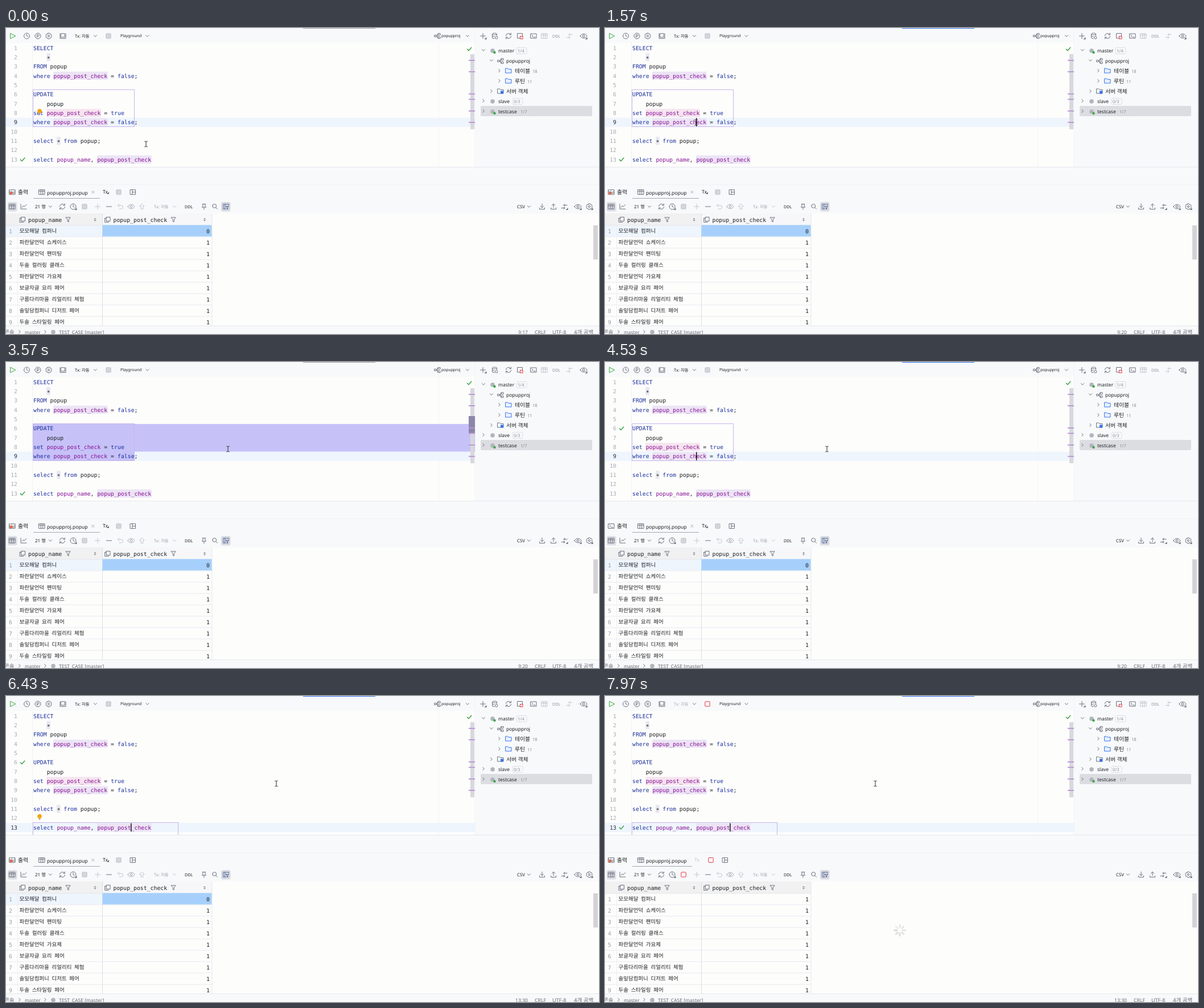
Animation, 1042 px wide and 538 px high, one loop 8 s. Source, as an HTML page:

```html
<!DOCTYPE html>
<html lang="en">
<head>
<meta charset="utf-8">
<title>SQL console</title>
<style>
html, body { margin: 0; width: 100%; height: 100%; overflow: hidden; background: #f8f9fa; }
svg { display: block; width: 1042px; height: 538px; }
text { white-space: pre; text-rendering: geometricPrecision; font-family: "Noto Sans", "Noto Sans CJK KR", sans-serif; }
.mono { font-family: "DejaVu Sans Mono", "Noto Sans Mono", monospace; }
.cjk { font-family: "Noto Sans Mono CJK KR", "Noto Sans CJK KR", monospace; }
.key { fill: #1c2f9c; }
.col { fill: #871094; }
.icon { fill: none; stroke-width: 1; stroke-linejoin: round; stroke-linecap: round; }
.on { animation: 8s step-end infinite; }

.focus { animation-name: focus; }
.bulb8 { animation-name: bulb8; }
.bulb12 { animation-name: bulb12; }
.caret9 { animation-name: caret9; }
.caret13 { animation-name: caret13; }
.pick6 { animation-name: pick6; }
.pick13 { animation-name: pick13; }
.at9 { animation-name: at9; }
.at13 { animation-name: at13; }
.check6 { animation-name: check6; }
.check13 { animation-name: check13; }
.badge { animation-name: badge; }
.pos1 { animation-name: pos1; }
.pos2 { animation-name: pos2; }
.idle { animation-name: idle; }
.busy { animation-name: busy; }
.mouse { animation: mouse 8s ease-in-out infinite; }
.spin { animation: spin 1s steps(8) infinite; }

@keyframes focus { 0%, 42.5%, 84% { opacity: 0 } 17.5%, 52.5%, 94% { opacity: 1 } }
@keyframes bulb8 { 0%, 27.5% { opacity: 1 } 17.5%, 42.5%, 100% { opacity: 0 } }
@keyframes bulb12 { 0%, 84%, 100% { opacity: 0 } 78.75% { opacity: 1 } }
@keyframes caret9 { 0%, 23.75%, 36.25%, 58.75%, 67.5%, 100% { opacity: 0 } 17.5%, 30%, 52.5%, 65% { opacity: 1 } }
@keyframes caret13 { 0%, 73.75%, 84% { opacity: 0 } 67.5%, 80%, 94% { opacity: 1 } }
@keyframes pick6 { 0%, 52.5%, 100% { opacity: 0 } 42.5% { opacity: 1 } }
@keyframes pick13 { 0%, 94%, 100% { opacity: 0 } 84% { opacity: 1 } }
@keyframes at9 { 0% { opacity: 1 } 67.5%, 100% { opacity: 0 } }
@keyframes at13 { 0% { opacity: 0 } 67.5%, 100% { opacity: 1 } }
@keyframes check6 { 0%, 94%, 100% { opacity: 0 } 52.5% { opacity: 1 } }
@keyframes check13 { 0%, 94% { opacity: 1 } 52.5% { opacity: 0 } }
@keyframes badge { 0%, 62.5% { opacity: 1 } 52.5% { opacity: 0 } }
@keyframes pos1 { 0% { opacity: 1 } 17.5%, 100% { opacity: 0 } }
@keyframes pos2 { 0%, 67.5%, 100% { opacity: 0 } 17.5% { opacity: 1 } }
@keyframes idle { 0% { opacity: 1 } 94.5%, 100% { opacity: 0 } }
@keyframes busy { 0% { opacity: 0 } 94.5%, 100% { opacity: 1 } }
@keyframes mouse {
  0%, 5% { transform: translate(246px, 204px) }
  15%, 21% { transform: translate(160px, 166px) }
  29%, 62% { transform: translate(390px, 153px) }
  66.5%, 69% { transform: translate(220px, 231px) }
  77%, 100% { transform: translate(475px, 154px) }
}
@keyframes spin { to { transform: rotate(360deg) } }
</style>
</head>
<body>
<svg id="stage" viewBox="0 0 1042 538"></svg>
<script>
const GREY = '#6c707e', DIM = '#c3c6cf', INK = '#1f2024', RED = '#db3b4b', GREEN = '#3fa54a', BLUE = '#3574f0';
const PANEL = '#f8f9fa', PAPER = '#fdfdfc';
const CH = 5.92, LEFT = 48, PITCH = 16.35;
const lineY = n => 35 + PITCH * (n - 1);
const ring = r => `M${-r} 0a${r} ${r} 0 1 0 ${2 * r} 0a${r} ${r} 0 1 0 ${-2 * r} 0`;

// Icon outlines, centred on 0,0
const icons = {
  run: 'M-4-4.6L4.8 0L-4 4.6Z',
  clock: ring(5) + 'M0-3V0L2.3 1',
  plan: ring(5) + 'M-1.3 2.6V-2.5H.6a1.5 1.5 0 0 1 0 3H-1.3',
  gear: 'M-1.3-5H1.3L2-3.4L3.8-3.6L5.1-1.4L4.1 0L5.1 1.4L3.8 3.6L2 3.4L1.3 5H-1.3L-2 3.4L-3.8 3.6L-5.1 1.4L-4.1 0L-5.1-1.4L-3.8-3.6L-2-3.4Z' + ring(1.6),
  screen: 'M-3.2-4.2H3.2V2.2H-3.2ZM-5-4.2V4.4H5V-4.2',
  down: 'M-2.6-1.3L0 1.3L2.6-1.3',
  right: 'M-1.3-2.6L1.3 0L-1.3 2.6',
  schema: 'M-5-1.5h3v3h-3zM1.5-4.5H5v3H1.5zM1.5 1.5H5v3H1.5zM-2 0H0M1.5-3H0V3H1.5',
  plus: 'M-4.5 0H4.5M0-4.5V4.5',
  minus: 'M-4.5 0H4.5',
  base: 'M-4.5-3.5c0-2 8-2 8 0s-8 2-8 0V3c0 1.3 2 1.7 3.5 1.7M3.5-3.5V-.5M-4.5-.3c0 1 2 1.6 3.5 1.6M.5 3a2.2 2.2 0 1 0 4.4 0a2.2 2.2 0 1 0-4.4 0',
  refresh: 'M-4.6-.5A4.7 4.7 0 0 1 4-2.4M4.4-5V-2.2H1.6M4.6.5A4.7 4.7 0 0 1-4 2.4M-4.4 5V2.2H-1.6',
  cut: 'M.5 4H-4.5V-4.5H4.5V0',
  console: 'M-5-4H5V4H-5ZM-3-2L-1-.2L-3 1.6M0 2H3',
  table: 'M-5-4.2H5V4.2H-5ZM-5-1.4H5M-1.7-4.2V4.2M1.7-4.2V4.2',
  swap: 'M5-2.5H-1M1-4.5L-1-2.5L1-.5M-5 2.5H1M-1 .5L1 2.5L-1 4.5',
  eye: 'M-6 0C-3.5-5 3.5-5 6 0C3.5 5-3.5 5-6 0Z' + ring(1.9),
  layout: 'M-4.5-4.2H4.5V4.2H-4.5ZM-1-4.2V4.2M-1 0H4.5',
  chart: 'M-5-4.5V4.2H5M-3 1.5L-.5-1.5L1 .3L4.8-3.5',
  undo: 'M-2-4.5L-4.5-2L-2 .5M-4.5-2H1.5a3 3 0 0 1 0 6H-2',
  up: 'M0-4.8L4.2-.5H1.8V4.5H-1.8V-.5H-4.2Z',
  pin: 'M-2.8-4.5H2.8M-2-4.5V-1L-3.5 1.2H3.5L2-1V-4.5M0 1.2V5',
  search: 'M-4.2-1a3.4 3.4 0 1 0 6.8 0a3.4 3.4 0 1 0-6.8 0M1.7 1.5L4.5 4.3',
  funnel: 'M-4-4H4L1 0V4L-1 3V0Z',
  filter: 'M-.5 4.2H-4.8V-4.2H4.8V-2.2M-1.8-4.2V4.2M0-.5H5L3.2 1.8V4.5H1.8V1.8Z',
  column: 'M-2-4.5H4.5V2.5H-2ZM-4.8-2.5V4.5H2M-4.8-2.5H-2',
  sort: 'M-1.5-1L0-2.6L1.5-1ZM-1.5 1L0 2.6L1.5 1Z',
  load: 'M0-4.8V1.8M-2.8-1L0 1.8L2.8-1M-4.5 2V4.5H4.5V2',
  send: 'M0 1.8V-4.8M-2.8-2L0-4.8L2.8-2M-4.5 2V4.5H4.5V2',
  folder: 'M-5-4H-1.5L0-2.6H5V4H-5Z',
  check: 'M-3.6 .2L-1 2.8L3.8-2.8',
  cross: 'M-2-2L2 2M2-2L-2 2',
  beam: 'M-2.3-4.8C-1-4.8 0-4.5 0-3.8C0-4.5 1-4.8 2.3-4.8M0-4V4M-2.3 4.8C-1 4.8 0 4.5 0 3.8C0 4.5 1 4.8 2.3 4.8'
};

const I = (name, x, y, color = GREY, extra = '') =>
  `<path class="icon" d="${icons[name]}" transform="translate(${x} ${y})" stroke="${color}" ${extra}/>`;
const R = (x, y, w, h, fill, extra = '') =>
  `<rect x="${x}" y="${y}" width="${w}" height="${h}" fill="${fill}" ${extra}/>`;
const T = (x, y, s, size = 8.6, fill = INK, extra = '') =>
  `<text x="${x}" y="${y + size * .36}" font-size="${size}" fill="${fill}" ${extra}>${s}</text>`;
const M = (x, y, s, fill = INK, extra = '') => T(x, y, s, 9.83, fill, 'class="mono" ' + extra);
const G = (name, body) => `<g class="on ${name}">${body}</g>`;
const dot = (x, y, r, fill) => `<circle cx="${x}" cy="${y}" r="${r}" fill="${fill}"/>`;
const stop = (x, y, on) => on
  ? R(x - 4.2, y - 4.2, 8.4, 8.4, '#fff3f3', `rx="1" stroke="${RED}"`)
  : R(x - 4.2, y - 4.2, 8.4, 8.4, '#d3d5db', 'rx="1" stroke="#c3c5cc"');
const corner = (x, y) => `<path d="M${x + 2.5} ${y + 6}h4v-4z" fill="${GREY}"/>`;
const row = (y, list) => list.map(([name, x, color]) => I(name, x, y, color)).join('');
const menu = list => list.map(([x, y]) => corner(x, y)).join('');
const bulb = y => dot(59, y, 3.8, '#f2a50f') + R(57.4, y + 4.2, 3.2, 1.4, '#8d8474');

function topBar() {
  return I('run', 12, 14, GREEN, 'style="fill:#eef8ee"') +
    row(14, [['clock', 36.5], ['plan', 56], ['gear', 75], ['screen', 100], ['down', 157], ['down', 248.5],
      ['schema', 758], ['down', 811], ['plus', 838], ['base', 859], ['refresh', 883], ['cut', 903],
      ['console', 927], ['table', 946, DIM], ['swap', 990, DIM], ['eye', 1015]]) +
    R(903.5, 14.5, 4.5, 4.5, '#fff', `stroke="${RED}"`) +
    menu([[838, 14], [1015, 14]]) +
    G('idle', T(121, 14, 'Tx: 자동', 7.5) + stop(180, 14)) +
    G('busy', T(121, 14, 'Tx: 자동', 7.5, '#a8abb5') + stop(180, 14, true)) +
    T(201, 14, 'Playground', 6.9) + T(765, 14, 'popupproj', 6.8) + T(960, 14, 'DDL', 7.1, '#8d909c') +
    R(522, 0, 127, 1, '#9a9ca6') + G('focus', R(522, 0, 127, 1, BLUE));
}

const code = ['SELECT', '    *', 'FROM popup', 'where popup_post_check = false;', '', 'UPDATE', '    popup',
  'set popup_post_check = true', 'where popup_post_check = false;', '', 'select * from popup;', '',
  'select popup_name, popup_post_check'];

// The asterisk is lowered to the middle of the line
function paint(s) {
  return s.replace(/\b(select|from|where|update|set|true|false)\b|popup_\w+/gi,
    (w, key) => `<tspan class="${key ? 'key' : 'col'}">${w}</tspan>`)
    .replace(/\*(.*)/, '<tspan dy="1.7">*</tspan><tspan dy="-1.7">$1</tspan>');
}

function marks(s, n) {
  return [...s.matchAll(/popup_post_check|\*/g)].map(m =>
    R(LEFT + m.index * CH - .4, lineY(n) - 7.2, m[0].length * CH + .8, 14.2,
      m[0] === '*' ? '#e9e7f1' : n === 8 ? '#f6e4ef' : '#ece4f5', 'rx="1"')).join('');
}

function editor() {
  const lines = code.map((s, i) => [s, i + 1]);
  const band = n => R(0, lineY(n) - 8.2, 824, 16.4, '#eff5fd');
  const frame = (w, y, h) => `<rect x="47.5" y="${y}" width="${w}" height="${h}" fill="none" stroke="#c7b5ea"/>`;
  const caret = (c, n) => R(LEFT + (c - 1) * CH - .5, lineY(n) - 7.5, 1.4, 14.5, '#000');
  const number = n => M(20, lineY(n), n, '#a9acb8', 'text-anchor="end"');
  const active = n => M(20, lineY(n), n, '#3f434e', 'text-anchor="end"');
  const ok = n => I('check', 29, lineY(n), GREEN, 'style="stroke-width:1.5"');
  const pick = '#c6c2f8';
  return `<svg width="824" height="244">` + R(0, 26, 824, 218, PAPER) +
    G('at9', band(9)) + G('at13', band(13)) +
    R(46, 26, 1, 218, '#f0f0f3') + R(760, 26, 1, 218, '#f3f4f6') +
    lines.map(([s, n]) => marks(s, n)).join('') +
    G('pick6', R(LEFT, 109, 776, 48.6, pick) + R(LEFT, 157, 178, 16.5, pick)) +
    G('pick13', R(LEFT, 223, 776, 21, pick)) +
    G('at9', frame(178, 108.5, 65)) + G('at13', frame(255, 222.5, 30)) +
    lines.map(([s, n]) => number(n) + M(LEFT, lineY(n), paint(s))).join('') +
    G('at9', active(9)) + G('at13', active(13)) +
    G('check6', ok(6)) + G('check13', ok(13)) +
    G('bulb8', bulb(146)) + G('bulb12', bulb(211.5)) +
    G('caret9', caret(20, 9)) + G('caret13', caret(30, 13)) +
    R(816, 46, 7, 132, '#d8d8de') + G('pick6', R(813, 95, 11, 31, '#8c86ab')) +
    [57, 77, 116, 125.5, 146, 166].map(y => R(813, y - 1, 11, 1.8, '#b795d3')).join('') +
    I('check', 814, 37, GREEN, 'style="stroke-width:1.5"') + '</svg>';
}

function tree() {
  const label = (x, y, s) => T(x, y, s, /[가-힣]/.test(s) ? 9.8 : 8.5);
  const badge = (x, y, s) => R(x - 2, y - 5.5, 18, 11, 'none', 'rx="2" stroke="#dcdee4"') + T(x, y, s, 7.6, '#8a8d98');
  const host = (y, name, x, count, open) =>
    I(open ? 'down' : 'right', 839, y - 1) + dot(855, y, 3.8, '#b0b5bd') + label(865, y, name) + badge(x, y, count);
  const folder = (x, y) => I('folder', x, y, BLUE, 'style="fill:#e9f0fe"');
  return R(834, 137, 196, 18, '#dcdde1', 'rx="2"') +
    host(40, 'master', 899, '1/4', true) + host(129, 'slave', 892, '0/3') + host(147, 'testcase', 904, '1/7') +
    dot(858.5, 43, 2.2, GREEN) + dot(858.5, 150, 2.2, GREEN) +
    I('down', 853, 57) + I('schema', 869, 58) + label(879, 58, 'popupproj') +
    I('right', 867, 75) + folder(883, 75) + label(894, 75, '테이블') + T(925, 76, '18', 7.6, '#8a8d98') +
    I('right', 867, 93) + folder(883, 93) + label(894, 93, '루틴') + T(916, 94, '11', 7.6, '#8a8d98') +
    I('right', 853, 111) + I('folder', 869, 111) + R(869, 110.5, 5, 5, BLUE) + label(879, 111, '서버 객체');
}

function tabs() {
  const tab = (end, extra) => R(48, 299, end - 48, 1, '#a2a6b2') + extra;
  return I('console', 11, 288.5) + G('badge', R(6, 283, 5, 11, PANEL) + I('layout', 11, 288.5, '#8a8d98') +
      `<path d="M7 287l6 3.2l-6 3.2z" fill="#e5623f"/>`) +
    T(21, 288.5, '출력', 9.8) + I('table', 63, 288.5, GREY) + T(72, 290, 'popupproj.popup', 8.67) +
    G('idle', tab(165, I('cross', 153, 288.5, '#a5a8b3') + T(170, 288, 'Tx', 8.6) + corner(174.5, 286) + stop(198, 288.5) + I('layout', 223, 288.5))) +
    G('busy', tab(153, T(157, 288, 'Tx', 8.6, DIM) + stop(186, 288.5, true) + I('layout', 211, 288.5)));
}

function gridBar() {
  const y = 314;
  return R(3, 306, 16.5, 16.5, '#dcdee4', 'rx="3"') + R(378, 306, 16.5, 16.5, '#d9dbe1', 'rx="3"') +
    row(y, [['table', 11], ['chart', 31], ['down', 78], ['refresh', 99], ['clock', 118], ['plus', 161, DIM],
      ['minus', 181], ['undo', 201, DIM], ['eye', 220, '#a5a8b3'], ['up', 239, DIM], ['down', 296, DIM],
      ['pin', 348], ['search', 367], ['filter', 386.5, '#56699a'], ['down', 919], ['load', 942],
      ['send', 962], ['swap', 981], ['eye', 1005], ['gear', 1025]]) +
    menu([[118, y], [981, y], [1005, y], [1025, y]]) +
    G('idle', stop(138, y)) + G('busy', stop(138, y, true)) +
    T(51, y, '21 행', 8) + T(260, y, 'Tx: 자동', 7.5, '#9da0ab') + T(314, y, 'DDL', 7.2) + T(898, y, 'CSV', 7.8);
}

const rows = ['모모해달 컴퍼니', '파란달언덕 쇼케이스', '파란달언덕 팬미팅', '두솔 컬러링 클래스', '파란달언덕 가요제',
  '보글자글 요리 페어', '구름다리마을 리얼리티 체험', '솔잎담컴퍼니 디저트 페어', '두솔 스타일링 페어'];

function grid() {
  const value = (v, y) => M(358, y, v, INK, 'text-anchor="end"');
  const head = (x, name, sort) => I('column', x, 337) + M(x + 10, 337, name) +
    I('funnel', x + 21 + name.length * CH, 337) + I('sort', sort, 337, GREY, `style="fill:${GREY};stroke-width:.3"`);
  const cells = rows.map((name, i) => {
    const y = 357 + 20 * i;
    return M(5, y, i + 1, '#9b9eaa') + T(23.5, y, name, 9.47, INK, 'class="cjk"') + (i ? value(1, y) : '');
  }).join('');
  const rules = rows.map((_, i) => R(0, 366.5 + 20 * i, 362, 1, '#e8e9ef')).join('');
  const spokes = Array.from({ length: 8 }, (_, i) =>
    `<path d="M0-5V-9.5" stroke="#8f9198" stroke-width="2.6" stroke-linecap="round" opacity="${.18 + i * .03}" transform="rotate(${i * 45})"/>`).join('');
  return R(0, 326, 1042, 197, PAPER) + R(0, 326, 362, 21, '#f1f1f2') + G('idle', R(170, 326, 192, 21, '#f7f7f9')) +
    G('idle', R(0, 347, 170, 19.5, '#eff5fd')) + R(0, 346.5, 362, 1, '#e4e5ea') + rules +
    R(20, 347, 1, 176, '#eeeff3') + R(169, 326, 1, 197, '#dddfe5') + R(361.5, 326, 1, 197, '#e6e7ec') +
    G('idle', R(169.5, 346.5, 192, 20, '#a6d0fb') + value(0, 357)) + G('busy', value(1, 357)) + cells +
    head(29, 'popup_name', 156.5) + head(178.5, 'popup_post_check', 349) +
    R(1032, 347, 8, 60, '#d3d3d7') +
    G('busy', `<g transform="translate(518 412)"><g class="spin">${spokes}</g></g>`);
}

function statusBar() {
  const y = 535, ink = '#6a6d78';
  const pos = s => T(917, y, s, 8.6, ink, 'text-anchor="end"');
  return R(0, 523, 1042, 15, PANEL) + R(0, 523, 1042, 1, '#e6e7ed') +
    T(-3, y, '콘솔', 9.6, ink) + I('right', 24, 534) + T(33, y, 'master', 8.4, ink) + I('right', 69, 534) +
    dot(83, 534.5, 3.8, '#b0b5bd') + T(93, y, 'TEST_CASE [master]', 8.55, ink) +
    G('pos1', pos('9:17')) + G('pos2', pos('9:20')) + G('at13', pos('13:30')) +
    T(929, y, 'CRLF', 8.7, ink) + T(960, y, 'UTF-8', 9, ink) + T(998, y, '4개 공백', 9.5, ink);
}

document.getElementById('stage').innerHTML =
  R(0, 0, 1042, 538, PANEL) + topBar() + editor() + R(0, 244, 1042, 1, '#e6e7ed') + R(0, 275, 1042, 1, '#f1f2f4') +
  R(824, 0, 1, 244, '#f1f2f4') + tree() + tabs() + gridBar() + grid() + statusBar() +
  `<g class="mouse">${I('beam', 0, 0, '#2a2a2a')}</g>`;
</script>
</body>
</html>
```
